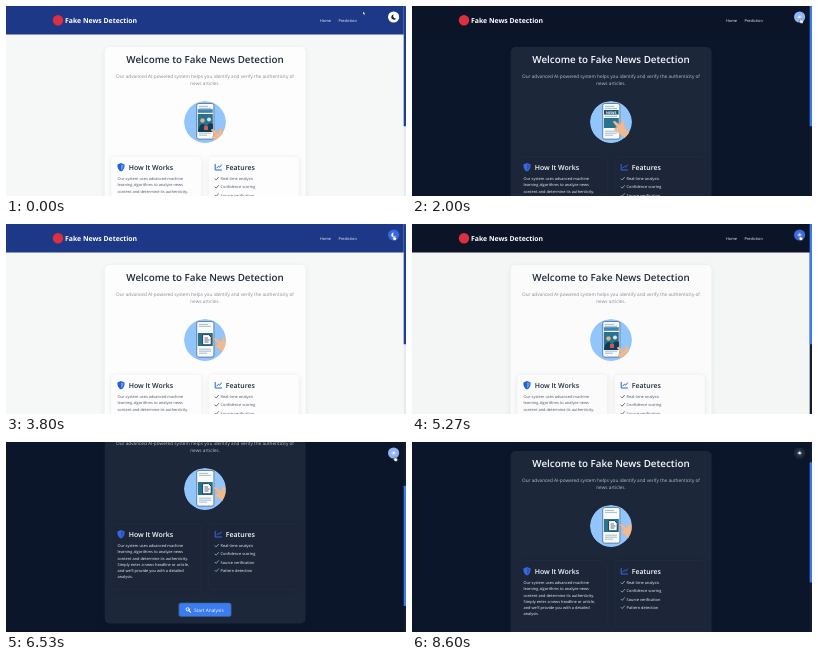
An HTML page for the animation above (8.67 s loop, 400 by 190 pixels).

```html
<!DOCTYPE html>
<html lang="en">
<head>
<meta charset="utf-8">
<title>Fake News Detection</title>
<style>
  html, body { margin: 0; width: 100%; height: 100%; overflow: hidden; }
  svg { display: block; width: 100%; height: 100%; background: var(--bg); }
  text { font-family: "Open Sans", "Noto Sans", sans-serif; text-rendering: geometricPrecision; }
  .bg { fill: var(--bg); }
  .nav { fill: var(--nav); }
  .card { fill: var(--card); }
  .box { fill: var(--box); stroke: var(--line); stroke-width: .4; }
  .shade { fill: #0f172a; opacity: var(--shade); filter: url(#blur); }
  .foot { fill: var(--foot); }
  .brand { font-size: 6.88px; font-weight: 700; fill: #fff; }
  .link { font-size: 3.9px; fill: #f1f5fb; }
  .title { font-size: 9.82px; font-weight: 600; fill: var(--title); }
  .lead { font-size: 4.71px; fill: var(--lead); }
  .head { font-size: 6.95px; font-weight: 600; fill: var(--title); }
  .copy { font-size: 3.92px; fill: var(--copy); }
  .go { font-size: 4.75px; font-weight: 500; fill: #fff; }
  .mid { text-anchor: middle; }
  .icon { fill: var(--icon); }
  .stroke { fill: none; stroke: var(--icon); stroke-width: 1; stroke-linecap: round; stroke-linejoin: round; }
  .check { fill: none; stroke: var(--check); stroke-width: .8; stroke-linecap: round; stroke-linejoin: round; }
  .ink { fill: none; stroke: #7fa3ba; stroke-width: .7; }
</style>
</head>
<body>
<svg id="stage" viewBox="0 0 400 190" preserveAspectRatio="none">
  <defs>
    <filter id="blur" x="-20%" y="-20%" width="140%" height="140%"><feGaussianBlur stdDeviation="3"/></filter>
    <clipPath id="disc"><circle cx="199" cy="116" r="21"/></clipPath>
    <clipPath id="screen"><rect x="191.3" y="98.3" width="16" height="34" rx="1.2"/></clipPath>
  </defs>
  <rect class="bg" width="400" height="190"/>

  <g id="page">
    <rect class="foot" y="257" width="400" height="60"/>
    <rect class="nav" width="400" height="28.5"/>
    <circle cx="52" cy="14.2" r="5.2" fill="#dc2f42"/>
    <text class="brand" x="59" y="16.7">Fake News Detection</text>
    <text class="link" x="314" y="15.7">Home</text>
    <text class="link" x="332.5" y="15.7">Prediction</text>

    <rect class="shade" x="99" y="43" width="200" height="208" rx="5"/>
    <rect class="card" x="98.7" y="41" width="200.8" height="209.5" rx="5"/>
    <text class="title mid" x="199" y="57.4">Welcome to Fake News Detection</text>
    <text class="lead mid" x="199" y="71.8">Our advanced AI-powered system helps you identify and verify the authenticity of</text>
    <text class="lead mid" x="199" y="79.4">news articles.</text>

    <g clip-path="url(#disc)">
      <circle cx="199" cy="116" r="21" fill="#93c5fd"/>
      <rect x="190.7" y="97.5" width="17.2" height="35.6" rx="2" fill="#f8fafc" stroke="#3d5c7a" stroke-width=".7"/>
      <g clip-path="url(#screen)">
        <path class="ink" d="M193 100.4h9M193 102.4h12"/>
        <path class="ink" d="M193 125.2h12M193 127.2h12M193 129.2h8"/>
        <rect id="photo" x="191.8" width="15" fill="#28738f"/>
        <g id="people">
          <rect x="191.8" y="103.2" width="15" height="3.6" fill="#3f86b5"/>
          <path d="M192 126q1-9 6-8l3 8zM199 126q2-11 8-8v8z" fill="#153a55"/>
          <circle cx="196.5" cy="114.5" r="2.2" fill="#e3b08e"/>
          <circle cx="203" cy="113.5" r="2" fill="#d9e6ec"/>
          <path d="M198 120h4v4h-4z" fill="#c85b52"/>
        </g>
        <g id="news">
          <rect x="192" y="104" width="14.6" height="4.6" fill="#1b5777"/>
          <text x="199.3" y="107.7" class="mid" font-size="3.6" font-weight="700" fill="#fff">NEWS</text>
          <path class="ink" d="M193 110.4h12"/>
        </g>
        <g id="paper">
          <path d="M196.6 110.6h6l2.6 2.6v7.6h-8.6z" fill="#fff" stroke="#1e3348" stroke-width=".9"/>
          <path d="M198.5 114h3.5M198.5 116h5M198.5 118h4" stroke="#1e3348" stroke-width=".7"/>
        </g>
      </g>
      <path id="palm" d="M-6-3Q-5-5-3-3L1 0L3-5Q5-6 5-3L6 3L12 9L7 15L0 8Q-4 6-5 4Q-3 2-2 2Z" fill="#efb992" stroke="#d9a27c" stroke-width=".3"/>
    </g>

    <rect class="shade" x="105.5" y="152" width="90" height="65" rx="4"/>
    <rect class="shade" x="203" y="152" width="90" height="65" rx="4"/>
    <rect class="box" x="105" y="150.5" width="90.5" height="66.5" rx="4"/>
    <rect class="box" x="202.5" y="150.5" width="90.5" height="66.5" rx="4"/>

    <path class="icon" d="M115 157l3.6 1.4q.3 5-3.6 7.2q-3.9-2.2-3.6-7.2z"/>
    <path class="card" d="M115 158.2v6.2q2.7-1.8 2.6-5.2z" opacity=".35"/>
    <text class="head" x="122.7" y="164">How It Works</text>
    <path class="stroke" d="M209.2 158.3v5.7h6.3M210.9 161.9l1.6-1.7l1.1 1l1.9-2.3"/>
    <text class="head" x="219.8" y="164">Features</text>
    <g id="copy"></g>
    <g id="list"></g>

    <rect x="172.6" y="229.7" width="52.8" height="14" rx="2.5" fill="#60a5fa" opacity=".55"/>
    <rect x="173.5" y="230.5" width="51" height="12.4" rx="2" fill="#3b7cf0"/>
    <g fill="none" stroke="#fff" stroke-linecap="round">
      <circle cx="181.7" cy="236.3" r="1.6" stroke-width=".9"/>
      <path d="M183 237.7l1.5 1.5" stroke-width="1.1"/>
    </g>
    <text class="go" x="188" y="238.6">Start Analysis</text>
  </g>

  <rect x="397.7" width="2.3" height="190" fill="var(--track)"/>
  <rect id="thumb" x="397.7" width="2.3" height="120.3" rx=".6" fill="var(--thumb)"/>

  <circle cx="387.6" cy="11" r="5.6" fill="var(--knob)"/>
  <path id="moon" d="M387.9 8.5a2.6 2.6 0 1 0 2.3 3.7a2.2 2.2 0 0 1-2.3-3.7z" fill="var(--moon)"/>
  <g id="sun">
    <circle cx="387.6" cy="11" r="1.3" fill="#f1f5f9"/>
    <circle cx="387.6" cy="11" r="2" fill="none" stroke="#f1f5f9" stroke-width=".7" stroke-dasharray=".6 .97"/>
  </g>

  <g id="cursor">
    <path id="arrow" d="M0 0v3.2l.8-.7l.6 1.2l.6-.3l-.6-1.1h1z" fill="#fff" stroke="#111827" stroke-width=".25"/>
    <path id="hand" d="M-.5 0q.5-.6 1 0v1.5l1.8.5q.5.2.4 1l-.4 1.8h-2.3l-1.5-2q.2-.7 1 0z" fill="#fff" stroke="#111827" stroke-width=".3"/>
  </g>
</svg>
<script>
const LOOP = 8670, FADE = 400, CYCLE = 2650;
const $ = id => document.getElementById(id);
const stage = $("stage");

const rgb = hex => [1, 3, 5].map(i => parseInt(hex.slice(i, i + 2), 16));
const pair = (a, b) => [rgb(a), rgb(b)];

// Each pair is light, dark.
const faded = {
  bg: pair("#f6f8f8", "#0c162a"), card: pair("#fefdfd", "#1d273a"),
  box: pair("#fdfdfe", "#1c2638"), line: pair("#edf0f3", "#263246"),
  title: pair("#1e293b", "#f8fafc"), lead: pair("#858b95", "#b9c1cc"),
  copy: pair("#4b5563", "#f1f5f9"), check: pair("#46525f", "#8cc0b2"),
  icon: pair("#1f62d8", "#3569e6"), foot: pair("#e8ecef", "#0a1120")
};
const snapped = {
  nav: pair("#1e3888", "#0c1528"), thumb: pair("#213f90", "#3b7cec"), track: pair("#e8ebee", "#131d30")
};
const knob = { idle: pair("#ffffff", "#1e293b"), hover: pair("#3769e2", "#8db4fa") };
const moon = pair("#14203c", "#ffffff");

const copy = ["Our system uses advanced machine", "learning algorithms to analyze news",
  "content and determine its authenticity.", "Simply enter a news headline or article,",
  "and we'll provide you with a detailed", "analysis."];
const list = ["Real-time analysis", "Confidence scoring", "Source verification", "Pattern detection"];
$("copy").innerHTML = copy.map((s, i) =>
  `<text class="copy" x="111.5" y="${174.2 + 6.25 * i}">${s}</text>`).join("");
$("list").innerHTML = list.map((s, i) => {
  const y = 174.2 + 8.2 * i;
  return `<path class="check" d="M209 ${y - 1.4}l1.2 1.2l2.3-2.7"/><text class="copy" x="214.6" y="${y}">${s}</text>`;
}).join("");

const smooth = x => (x = Math.max(0, Math.min(1, x)), x * x * (3 - 2 * x));
const lerp = (a, b, k) => a + (b - a) * k;
const mix = ([a, b], k) => a.map((v, i) => Math.round(lerp(v, b[i], k)));

// Eased value from [time, value] stops.
function track(stops, t) {
  let v = stops[0][1];
  for (let i = 1; i < stops.length; i++) {
    const [a, from] = stops[i - 1], [b, to] = stops[i];
    if (t >= a) v = lerp(from, to, smooth((t - a) / (b - a)));
  }
  return v;
}

const paint = (name, color) => stage.style.setProperty("--" + name, `rgb(${color})`);
const move = (id, x, y) => $(id).setAttribute("transform", `translate(${x} ${y})`);
const fade = (id, v) => $(id).setAttribute("opacity", v);

const DARK = 1040, LIGHT = 2400, AGAIN = 5250;
const themeStops = [[DARK, 0], [DARK + FADE, 1], [LIGHT, 1], [LIGHT + FADE, 0], [AGAIN, 0], [AGAIN + FADE, 1]];
const scrollStops = [[5750, 0], [6430, 69], [6650, 69], [7100, 50], [7400, 50], [8080, 32]];
const hoverStops = [[600, 0], [800, 1], [6680, 1], [6880, 0]];
const cursorX = [[60, 357], [800, 387.8], [1500, 388.6], [2700, 388.6], [3700, 387.7], [5200, 388], [6400, 388.8], [6600, 388.8], [7000, 392]];
const cursorY = [[60, 5.5], [800, 11.5], [1500, 12.5], [3700, 11.5], [5200, 11.5], [6400, 14.5], [6600, 14.5], [7000, -8]];

// Phone poses: scene, document, headline, scene.
const poses = (a, b, c) => [[200, a], [550, b], [1400, b], [1750, c], [2200, c], [2500, a]];
const photoY = poses(108, 109, 112), photoH = poses(18, 13, 10);
const people = poses(1, 0, 0), paper = poses(0, 1, 0), news = poses(0, 0, 1);
const palmX = poses(211, 214, 207), palmY = poses(127, 118, 119);

function drawPhone(t) {
  const at = stops => track(stops, t % CYCLE);
  $("photo").setAttribute("y", at(photoY));
  $("photo").setAttribute("height", at(photoH));
  fade("people", at(people));
  fade("news", at(news));
  fade("paper", at(paper));
  move("palm", at(palmX), at(palmY));
}

function draw(t) {
  const dark = t >= AGAIN || (t >= DARK && t < LIGHT);
  const k = track(themeStops, t), scroll = track(scrollStops, t), hover = track(hoverStops, t);
  for (const n in faded) paint(n, mix(faded[n], k));
  for (const n in snapped) paint(n, snapped[n][+dark]);
  stage.style.setProperty("--shade", lerp(.09, .16, k));

  paint("knob", mix([mix(knob.idle, k), mix(knob.hover, k)], hover));
  paint("moon", mix(moon, hover));
  fade("moon", dark ? 0 : 1);
  fade("sun", dark ? 1 : 0);

  move("page", 0, -scroll);
  $("thumb").setAttribute("y", scroll * 190 / 300);

  const pointing = t > 620;
  move("cursor", track(cursorX, t), track(cursorY, t));
  fade("hand", pointing ? 1 : 0);
  fade("arrow", pointing ? 0 : 1);
  drawPhone(t);
}

const start = performance.now();
function tick() {
  draw((performance.now() - start) % LOOP);
  requestAnimationFrame(tick);
}
tick();
</script>
</body>
</html>
```
